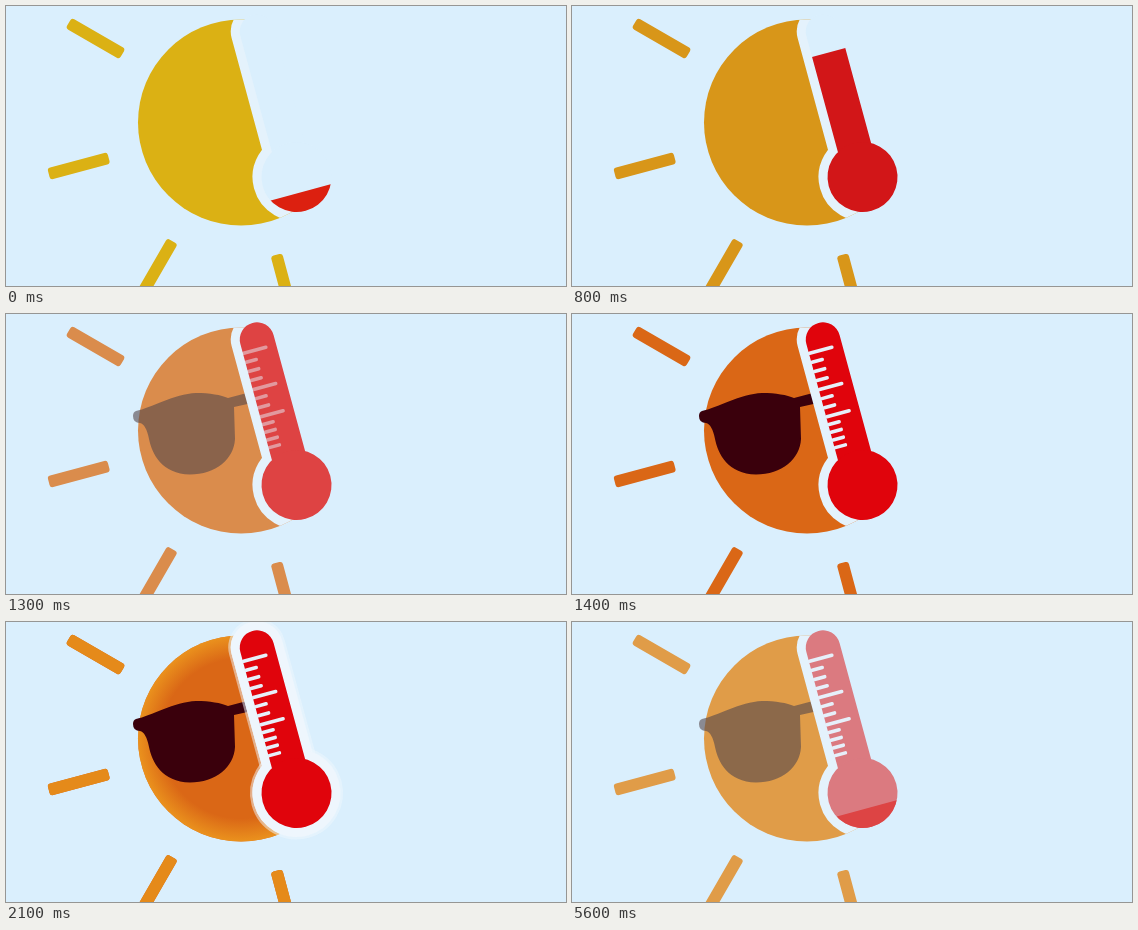
Recreate the animation shown at these times as an HTML page with a canvas. Size 560x280 px, loop 5700 ms.

```html
<!DOCTYPE html>
<html lang="en">
<head>
<meta charset="utf-8">
<title>Hot sun</title>
<style>
html, body { margin: 0; overflow: hidden; background: #daeffd; }
canvas { display: block; }
</style>
</head>
<body>
<canvas id="stage" width="560" height="280"></canvas>
<script>
const ctx = document.getElementById('stage').getContext('2d');
const LOOP = 5700, SKY = '#daeffd', RIM = '#e4f2fc', FULL = 170;
const SUN = { x: 235, y: 116.5, r: 103 };
const TILT = -15.2 * Math.PI / 180;

// Each step holds until the next; a step inherits what it does not set.
const steps = [
  { at: 0, level: -16, sun: '#dbb114', red: '#dc2010', base: null, shades: null, ticks: 0, glow: 0 },
  { at: 200, level: 3 },
  { at: 400, level: 50, sun: '#dba515', red: '#dc1408' },
  { at: 600, level: 90, sun: '#d99d17', red: '#d71510' },
  { at: 800, level: 129, sun: '#d89619', red: '#d21618' },
  { at: 1000, level: FULL, sun: '#d68e1b', red: '#cc1620' },
  { at: 1300, sun: '#da8c4c', red: '#de4343', shades: 'rgba(85,73,76,.6)', ticks: .5 },
  { at: 1400, sun: '#da6716', red: '#e0040c', shades: '#3a000c', ticks: 1 },
  { at: 1600, glow: 1 },
  { at: 1800, glow: 0 },
  { at: 2000, glow: .5 },
  { at: 2100, glow: 1 },
  { at: 2200, glow: 0 },
  { at: 2400, glow: 1 },
  { at: 2600, glow: 0 },
  { at: 5600, level: -16, sun: '#e09c48', red: '#dd4444', base: '#db7a80', shades: 'rgba(85,73,76,.6)' }
];
steps.forEach((step, i) => { steps[i] = { ...steps[i - 1], ...step }; });

const disc = new Path2D();
disc.arc(SUN.x, SUN.y, SUN.r, 0, 7);

// Thermometer parts, upright, with the bulb centre at 0,0
const bulb = new Path2D(), stem = new Path2D();
bulb.arc(0, 0, 35, 0, 7);
stem.roundRect(-17.2, -168, 34.4, 168, [17.2, 17.2, 0, 0]);

const glasses = new Path2D(`M130 97C145 94 168 80 190 79C204 79 215 81 222 84L239 79.5
  L246 78V89L228 93L229 125C228 145 210 160.5 184 160.5C156 160 146 140 143 125
  C141 115 138 110 134 109Q127 109 127 102Q127 98 130 97Z`);

const glowFill = ctx.createRadialGradient(SUN.x, SUN.y, 80, SUN.x, SUN.y, SUN.r);
glowFill.addColorStop(0, 'rgba(236,150,30,0)');
glowFill.addColorStop(1, 'rgba(236,150,30,.9)');

function scoped(draw) {
  ctx.save();
  draw();
  ctx.restore();
}

function toThermometer() {
  ctx.translate(290.5, 171);
  ctx.rotate(TILT);
}

function fillThermometer(color) {
  ctx.fillStyle = color;
  ctx.fill(stem);
  ctx.fill(bulb);
}

function outlineThermometer(color, width) {
  ctx.strokeStyle = color;
  ctx.lineWidth = width;
  ctx.stroke(stem);
  ctx.stroke(bulb);
}

function drawRays(color) {
  ctx.fillStyle = color;
  for (let i = 0; i < 4; i++) scoped(() => {
    ctx.translate(SUN.x, SUN.y);
    ctx.rotate((210 - 45 * i) * Math.PI / 180);
    ctx.beginPath();
    ctx.roundRect(137, -6, 62, 12, 3);
    ctx.fill();
  });
}

function drawSun({ sun, shades, glow }) {
  drawRays(sun);
  scoped(() => {
    ctx.globalAlpha = glow;
    drawRays('#e58a1a');
  });
  scoped(() => {
    // Only the part left of the thermometer axis shows
    scopedClipLeft();
    ctx.fillStyle = sun;
    ctx.fill(disc);
    scoped(() => {
      ctx.globalAlpha = glow;
      ctx.fillStyle = glowFill;
      ctx.fill(disc);
    });
    if (shades) {
      ctx.fillStyle = shades;
      ctx.fill(glasses);
    }
    ctx.clip(disc);
    toThermometer();
    outlineThermometer(RIM, 18);
  });
}

function scopedClipLeft() {
  const area = new Path2D(), left = new Path2D();
  left.rect(-400, -400, 400, 800);
  area.addPath(left, new DOMMatrix().translate(290.5, 171).rotate(-15.2));
  ctx.clip(area);
}

function drawTicks(alpha) {
  ctx.globalAlpha = alpha;
  ctx.strokeStyle = '#e6f0fa';
  ctx.lineWidth = 3.6;
  ctx.lineCap = 'round';
  for (let i = 0; i < 12; i++) {
    const y = i < 8 ? 9.4 * i - 141 : 8 * (i - 7) - 75.2;
    ctx.beginPath();
    ctx.moveTo(-16.5, y);
    ctx.lineTo(i === 0 || i === 4 || i === 7 ? 6.5 : -6, y);
    ctx.stroke();
  }
}

function drawThermometer({ level, red, base, ticks, glow }) {
  toThermometer();
  scoped(() => {
    ctx.globalAlpha = glow;
    outlineThermometer('rgba(240,248,254,.5)', 23);
    outlineThermometer('#eef6fd', 18);
  });
  fillThermometer(base || SKY);
  scoped(() => {
    ctx.beginPath();
    ctx.rect(-50, -level, 100, 300);
    ctx.clip();
    fillThermometer(red);
  });
  drawTicks(ticks);
}

function frame(now) {
  const t = now % LOOP;
  const step = steps.findLast(s => s.at <= t);
  ctx.fillStyle = SKY;
  ctx.fillRect(0, 0, 560, 280);
  drawSun(step);
  scoped(() => drawThermometer(step));
  requestAnimationFrame(frame);
}
frame(0);
</script>
</body>
</html>
```
